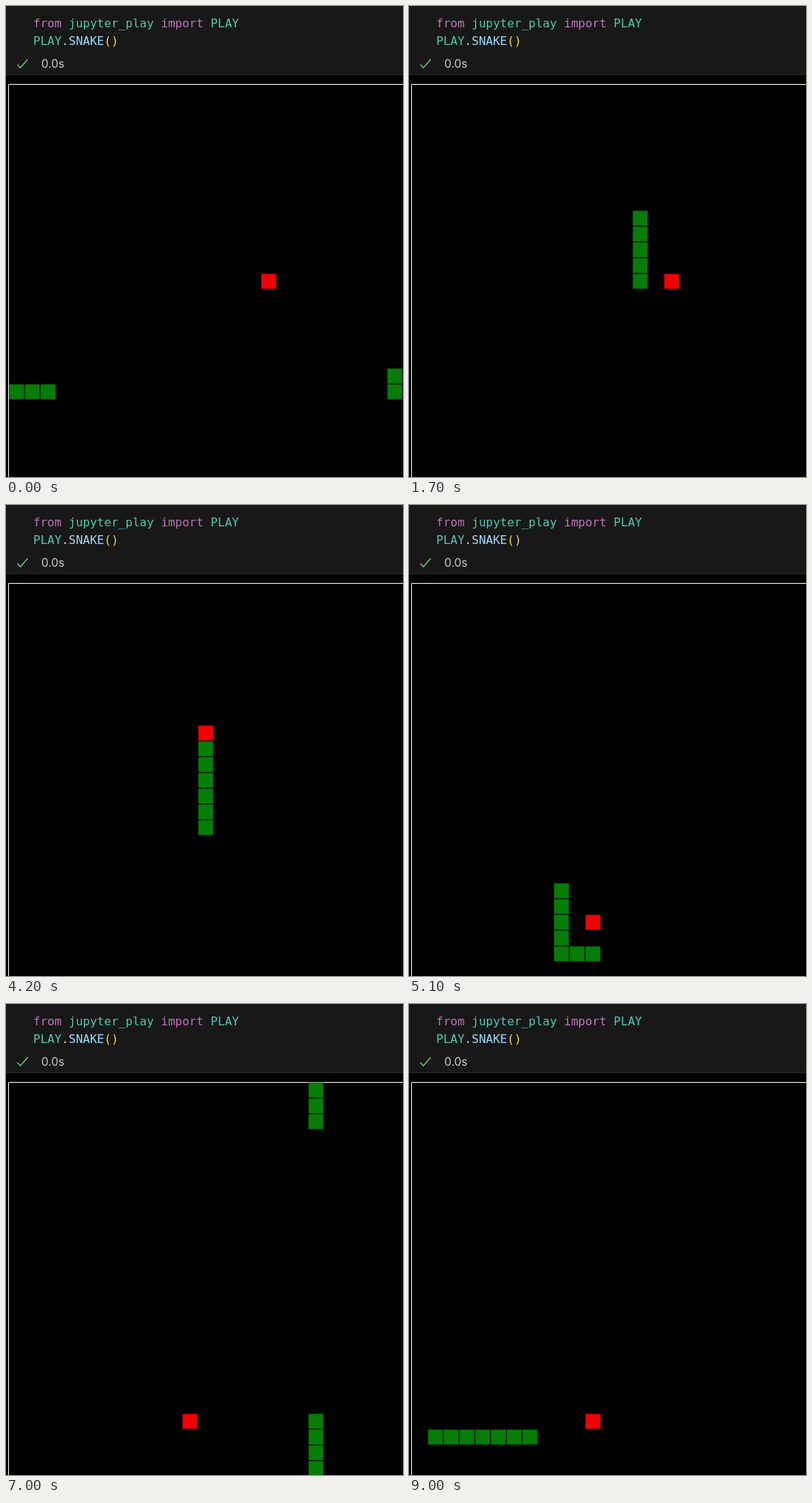
An HTML page with a canvas for the animation above (9100 ms loop, 540 px wide and 640 px high).

```html
<!DOCTYPE html>
<html lang="en">
<head>
<meta charset="utf-8">
<title>Snake in a notebook</title>
<style>
  html, body { margin: 0; width: 100%; height: 100%; overflow: hidden; background: #000; }
  svg, canvas { position: absolute; left: 0; top: 0; display: block; }
  .code { font: 16.05px "DejaVu Sans Mono", monospace; white-space: pre; }
  .key { fill: #c072bb; }
  .name { fill: #4ec9a8; }
  .dot { fill: #d4d4d4; }
  .call { fill: #9cdcfe; }
  .paren { fill: #f2d655; }
  .time { font: 15.5px Inter, sans-serif; fill: #ccc; }
</style>
</head>
<body>
<svg width="540" height="640" viewBox="0 0 540 640">
  <rect width="540" height="93" fill="#181818"/>
  <rect y="93" width="540" height="1" fill="#2b2b2b"/>
  <text class="code" x="37" y="29"><tspan class="key">from</tspan> <tspan class="name">jupyter_play</tspan> <tspan class="key">import</tspan> <tspan class="name">PLAY</tspan></text>
  <text class="code" x="37" y="53"><tspan class="name">PLAY</tspan><tspan class="dot">.</tspan><tspan class="call">SNAKE</tspan><tspan class="paren">()</tspan></text>
  <path d="M15.5 79.5 L19.5 84 L29.5 72.5" fill="none" stroke="#73c973" stroke-width="1.4"/>
  <text class="time" x="48" y="84">0.0s</text>
  <path d="M3.5 640 V106.5 H540" fill="none" stroke="#fff"/>
</svg>
<canvas id="field" width="540" height="640"></canvas>
<script>
const LOOP = 9100, FRAME = 100;
const GRID = 25, CELL = 21.43, LEFT = 3.8, TOP = 106.3;
const DIRS = { U: [0, -1], D: [0, 1], L: [-1, 0], R: [1, 0] };
const foods = [[16, 12], [12, 9], [11, 21]];

// Each leg: end time in ms, then the moves made during it.
const legs = [
  [0, "D1 R3"],
  [1700, "R20 U14 L8 D7"],
  [2700, "D2 L7 D3 R16"],
  [4200, "U6 L7 D13 L4 U14"],
  [6000, "U4 L3 D17 R4 U4 L9 U5 R5"],
  [7000, "D5 L15 D8"],
  [9000, "D16 R21 D4 L14"]
];

const trail = [[24, 18]];
const marks = legs.map(([time, moves]) => {
  for (const move of moves.split(" ")) {
    const [dx, dy] = DIRS[move[0]];
    for (let n = +move.slice(1); n > 0; n--) {
      const [x, y] = trail[trail.length - 1];
      trail.push([(x + dx + GRID) % GRID, (y + dy + GRID) % GRID]);
    }
  }
  return { time, step: trail.length - 1 };
});

// Number of foods eaten on arrival at each step.
let count = 0;
const eaten = trail.map(([x, y]) => {
  const [fx, fy] = foods[count];
  if (x === fx && y === fy) count++;
  return count;
});

function stepAt(t) {
  const i = marks.findIndex(m => m.time > t);
  if (i < 0) return trail.length - 1;
  const a = marks[i - 1], b = marks[i];
  return Math.round(a.step + (b.step - a.step) * (t - a.time) / (b.time - a.time));
}

const ctx = document.getElementById("field").getContext("2d");

function drawCell([col, row], fill, edge) {
  const x = LEFT + col * CELL, y = TOP + row * CELL;
  ctx.fillStyle = edge;
  ctx.fillRect(x + 0.3, y + 0.3, 20.8, 20.8);
  ctx.fillStyle = fill;
  ctx.fillRect(x + 1, y + 1, 19.4, 19.4);
}

function draw(t) {
  const head = stepAt(t), length = 5 + eaten[head];
  ctx.clearRect(0, 0, 540, 640);
  for (const cell of trail.slice(head - length + 1, head + 1)) {
    drawCell(cell, "#067d06", "#034803");
  }
  drawCell(foods[eaten[head]], "#f00000", "#900000");
}

const start = performance.now();
function tick() {
  const t = (performance.now() - start) % LOOP;
  draw(Math.floor(t / FRAME) * FRAME);
  requestAnimationFrame(tick);
}
tick();
</script>
</body>
</html>
```
